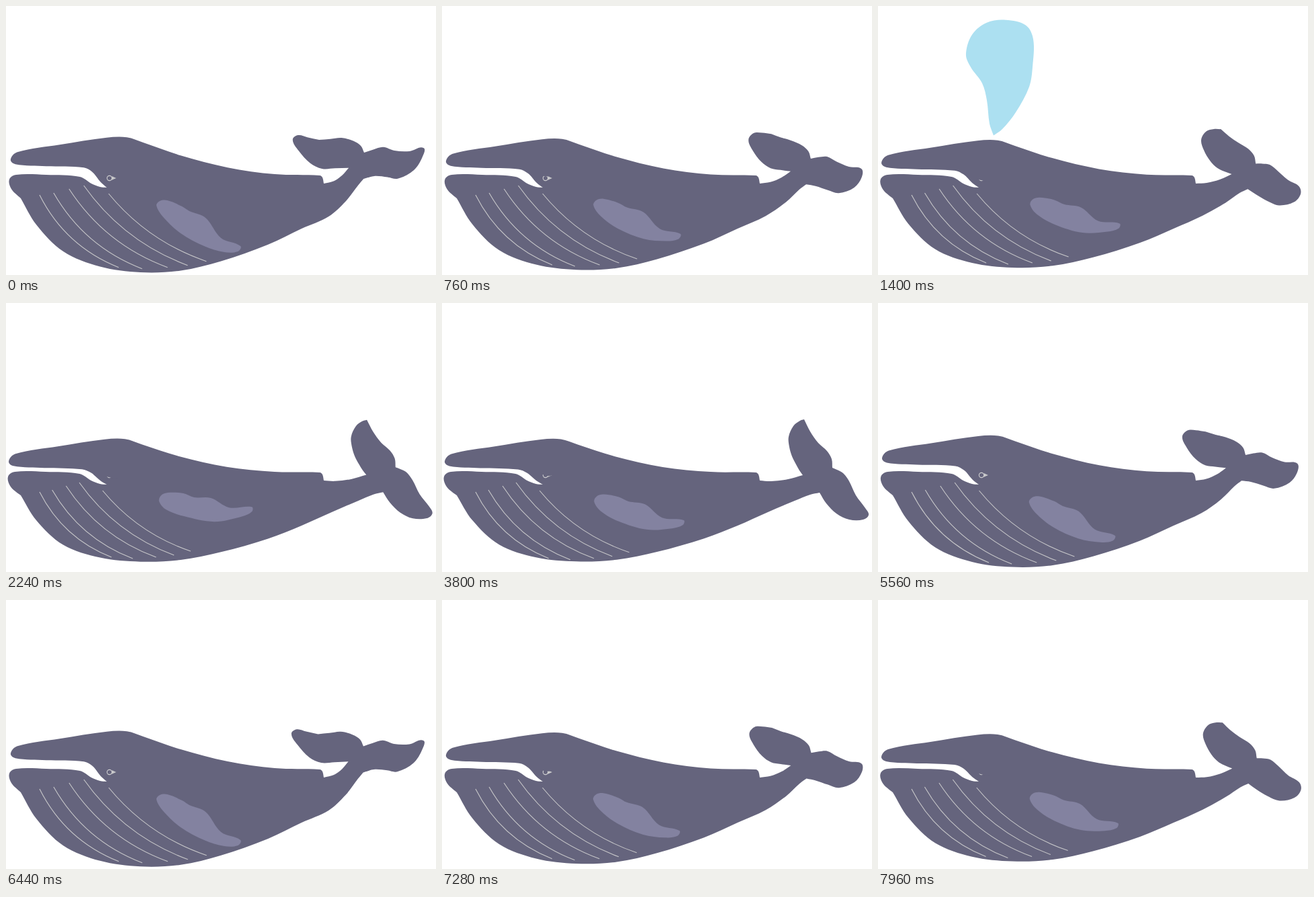
Animation, 640 px wide and 400 px high, one loop 8000 ms. Source, as an HTML page:

```html
<!DOCTYPE html>
<html lang="en">
<head>
<meta charset="utf-8">
<title>Whale</title>
<style>
  html, body { margin: 0; width: 100%; height: 100%; overflow: hidden; background: #fff; }
  svg { display: block; width: 640px; height: 400px; }
</style>
</head>
<body>
<svg viewBox="0 0 640 400">
  <path id="spout" fill="#ace0f1"/>
  <path id="body" fill="#65647d"/>
  <path id="fin" fill="#8382a0"/>
  <path id="stripes" fill="none" stroke="#c8c8ca" stroke-width="1.1"/>
  <circle cx="154" cy="256" r="3.6" fill="none" stroke="#d0d0d2" stroke-width="1.1"/>
  <path d="M157.5 253 L164 256 L157 259Z" fill="#c8c8ca"/>
  <path id="lid" fill="#65647d"/>
</svg>
<script>
const LOOP = 8000;

// Key points of the whale with its tail down; rules below bend them.
const BACK = [150,270, 141,262, 129,247, 116,240, 60,238, 14,235, 7,228, 17,217, 80,206, 150,195.5, 180,195, 205,203, 260,222, 330,240, 400,250, 467,252, 471,255, 473,264];
const BELLY = [390,355, 320,380, 260,394, 200,396.5, 140,388, 85,365, 45,325, 22,286];
const JAW = [22,286, 8,272, 5,258, 15,251, 60,251, 110,254, 127,264, 140,269, 150,270];

// Tail edges between sharp corners, each as [down, up].
const TAIL = {
  stock: [
    [473,264, 488,260, 500,251, 509,240],
    [473,264, 490,265, 515,262, 537,256]
  ],
  farInner: [
    [509,240, 488,241, 468,242, 450,234, 432,215, 423,199, 431,192.5, 445,196, 463,200],
    [537,256, 532,249, 527,240, 521,228, 517,214, 516,199, 523,183, 533,175, 539,173]
  ],
  farOuter: [
    [463,200, 480,198, 497,195.5, 515,200, 526,207, 531,217],
    [539,173, 548,191, 560,208, 573,220, 580,232, 581,245]
  ],
  near: [
    [531,217, 545,212, 560,208, 577,213, 600,213, 621,207, 619,221, 606,241, 582,254, 567,252, 547,251, 531,256],
    [581,245, 588,248, 597,253, 606,265, 616,286, 630,305, 635,315, 627,322, 606,322, 587,313, 572,298, 562,282]
  ],
  under: [
    [531,256, 523,266, 505,290, 480,313, 440,331],
    [562,282, 548,285, 525,294, 485,311, 440,331]
  ]
};

const FIN = [
  [224,297, 229,290, 240,289, 262,298, 273,305, 297,315, 320,345, 349,357, 345,365, 325,366, 295,357, 260,338, 235,315],
  [228,295, 231,286, 241,282, 264,283, 280,289, 305,290, 332,304, 366,303, 366,310, 352,317, 310,325, 265,317, 238,307]
];

// Start and end of each throat line.
const STRIPES = [
  [50,281, 168,389], [71,278, 203,391], [94,272, 241,389], [116,267, 271,386], [153,279, 299,380]
];

const HOLE = [172, 192.5];
const SPOUT = [...HOLE, 166,175, 162,140, 155,115, 138,91, 131,72, 140,43, 162,25, 190,21, 220,29, 231,50, 230,90, 225,120, 205,158, 185,183, ...HOLE];

const clamp = v => Math.max(0, Math.min(1, v));
const mix = ([a, b], p) => a.map((v, i) => v + (b[i] - v) * p);
const text = list => list.map(v => v.toFixed(2)).join(' ');
const start = flat => 'M' + text(flat.slice(0, 2));
const draw = (id, d) => document.getElementById(id).setAttribute('d', d);

// Linear swing: 0 and 1 in turn at the given turning times.
function swing(t, turns) {
  const i = turns.findLastIndex(turn => turn <= t);
  const part = (t - turns[i]) / (turns[i + 1] - turns[i]);
  return i % 2 ? 1 - part : part;
}

function movePoints(flat, rule) {
  const out = [];
  for (let i = 0; i < flat.length; i += 2) out.push(...rule(flat[i], flat[i + 1]));
  return out;
}

// Smooth Bezier pieces through the points, handles as long as a third of each span.
function curve(flat, closed) {
  const n = flat.length / 2;
  const point = i => {
    const k = closed ? (i + n) % n : Math.max(0, Math.min(n - 1, i));
    return [flat[2 * k], flat[2 * k + 1]];
  };
  const handle = (i, length) => {
    const [ax, ay] = point(i - 1), [bx, by] = point(i + 1);
    const s = length / (Math.hypot(bx - ax, by - ay) || 1);
    return [(bx - ax) * s, (by - ay) * s];
  };
  let d = '';
  for (let i = 0; i < (closed ? n : n - 1); i++) {
    const [ax, ay] = point(i), [bx, by] = point(i + 1);
    const third = Math.hypot(bx - ax, by - ay) / 3;
    const [ux, uy] = handle(i, third), [vx, vy] = handle(i + 1, third);
    d += 'C' + text([ax + ux, ay + uy, bx - vx, by - vy, bx, by]);
  }
  return d;
}

function drawBody(p) {
  const back = movePoints(BACK, (x, y) => {
    const sink = p * clamp((450 - x) / 230) * clamp((270 - y) / 30);
    return [x - 3 * sink, y + 7.5 * sink];
  });
  const belly = movePoints(BELLY, (x, y) =>
    [x, y - 12.5 * p * Math.sin(Math.PI * (x - 22) / 420)]);
  const jaw = movePoints(JAW, (x, y) => [x - 2 * p * (1 - x / 150), y]);
  const { stock, farInner, farOuter, near, under } = TAIL;
  const tail = [stock, farInner, farOuter, near].map(poses => mix(poses, p));
  const edges = [back, ...tail, [...mix(under, p), ...belly], jaw];
  draw('body', start(back) + edges.map(edge => curve(edge)).join('') + 'Z');
}

function drawFin(p) {
  const fin = mix(FIN, p);
  draw('fin', start(fin) + curve(fin, true) + 'Z');
}

function drawStripes(p) {
  draw('stripes', STRIPES.map(([x, y, endX, endY], i) => {
    x -= 2.3 * i * p;
    endX -= (11 + 3.3 * i) * p;
    endY -= 11 * p;
    const bow = .19 - .012 * i;
    const midX = (x + endX) / 2 - bow * (endY - y);
    const midY = (y + endY) / 2 + bow * (endX - x);
    return 'M' + text([x, y]) + 'Q' + text([midX, midY, endX, endY]);
  }).join(''));
}

function drawLid(p) {
  const side = 250 + 7 * p, middle = 250 + 11 * Math.sin(p * Math.PI / 2);
  draw('lid', `M148 ${side}Q156 ${middle} 166 ${side + 4 * p * p}V250H148Z`);
}

function drawSpout(p) {
  const size = 1.12 * Math.sin(Math.PI * p);
  const spout = SPOUT.map((v, i) => HOLE[i % 2] + (v - HOLE[i % 2]) * size);
  draw('spout', p > 0 && p < 1 ? start(spout) + curve(spout) + 'Z' : '');
}

function render(t) {
  drawBody(1.3 * swing(t, [-95, 3020, 6395, 9510]));
  drawFin(swing(t, [0, 2250, 6440, 9700]));
  drawStripes(1.2 * swing(t, [-70, 2700, 6400, 9170]));
  drawLid(clamp(2.4 * swing(t, [-240, 2000, 6400, 8160]) - .8));
  drawSpout((t - 950) / 1280);
}

function tick() {
  render(performance.now() % LOOP);
  requestAnimationFrame(tick);
}
tick();
</script>
</body>
</html>
```
